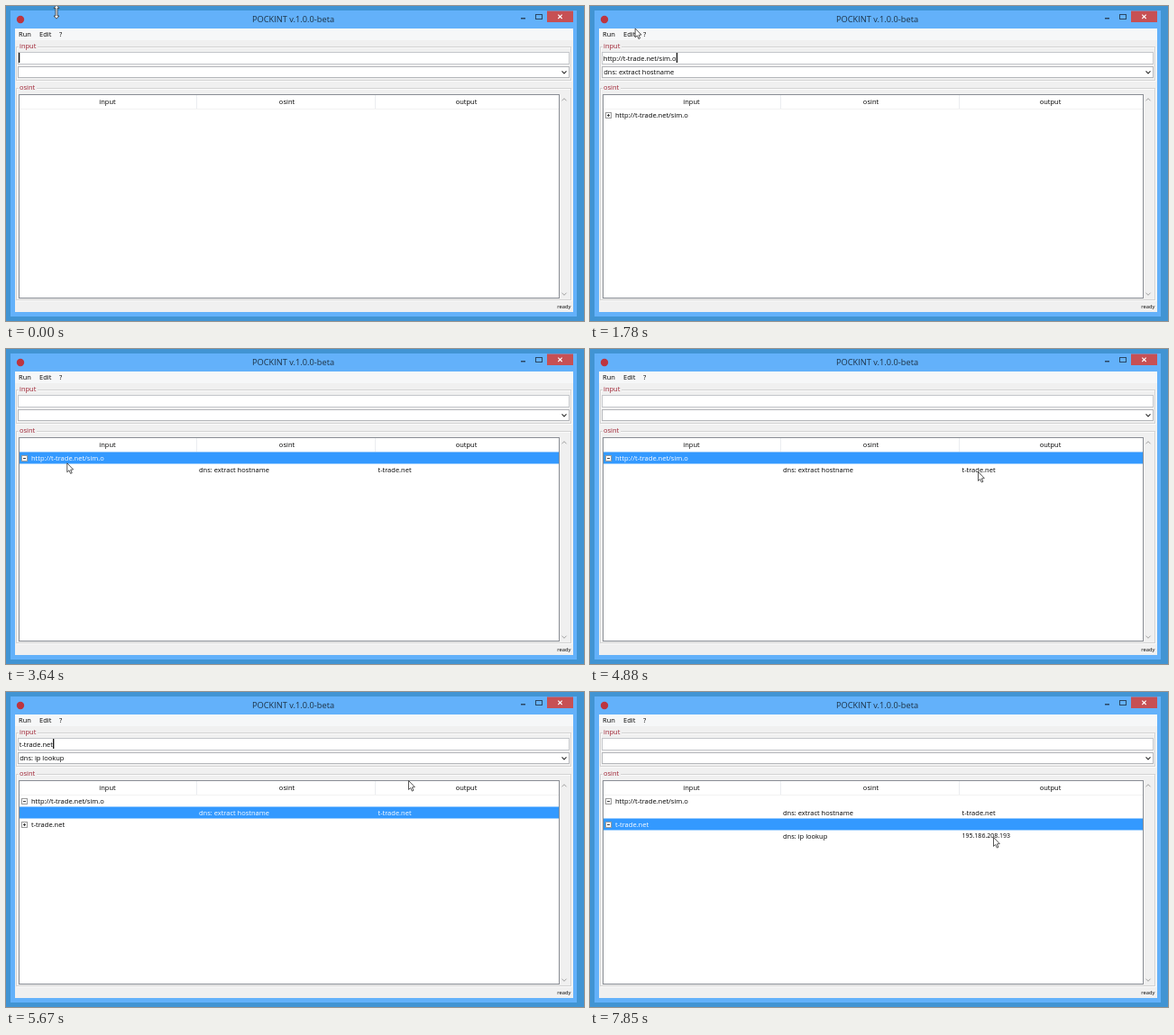
Animation, 641 px wide and 350 px high, one loop 8 s. Source, as an HTML page with a canvas:

```html
<!DOCTYPE html>
<html lang="en">
<head>
<meta charset="utf-8">
<title>POCKINT</title>
<style>
html, body { margin: 0; width: 641px; height: 350px; overflow: hidden; background: #4194d3; }
canvas { display: block; width: 641px; height: 350px; }
</style>
</head>
<body>
<canvas id="stage"></canvas>
<script>
const W = 641, H = 350, LOOP = 8000, STEP = 155;
const INK = '#000', BLUE = '#3399ff', RED = '#9e2030', GLYPH = '#2b4763';
const FONT = '"Open Sans", "Noto Sans", sans-serif';

const canvas = document.getElementById('stage');
const dpr = window.devicePixelRatio || 1;
canvas.width = W * dpr;
canvas.height = H * dpr;
const ctx = canvas.getContext('2d');
ctx.scale(dpr, dpr);

// Each query is pasted, focuses the list, is run, and is then opened in the tree
const queries = [
  { text: 'http://t-trade.net/sim.o', kind: 'url', task: 'dns: extract hostname',
    answer: 't-trade.net', size: 7.5, paste: 700, focus: 1160, run: 1640, open: 3340 },
  { text: 't-trade.net', kind: 'domain', task: 'dns: ip lookup',
    answer: '195.186.208.193', size: 7, paste: 5040, focus: 5040, run: 5670, open: 7070 }
];

const home = { x: 57, y: 1 };
const moves = [
  { from: 1480, to: 2560, x: 18, y: 125 },
  { from: 3340, to: 4730, x: 430, y: 136 },
  { from: 5160, to: 5500, x: 446, y: 98 },
  { from: 5670, to: 6600, x: 18, y: 147 },
  { from: 7070, to: 7800, x: 447, y: 161 }
];

function rect(x, y, w, h, color) {
  ctx.fillStyle = color;
  ctx.fillRect(x, y, w, h);
}

function frame(x, y, w, h, color) {
  ctx.strokeStyle = color;
  ctx.lineWidth = 1;
  ctx.strokeRect(x + 0.5, y + 0.5, w - 1, h - 1);
}

function box(x, y, w, h, border) {
  rect(x, y, w, h, '#fff');
  frame(x, y, w, h, border);
}

function line(points, color, width) {
  ctx.strokeStyle = color;
  ctx.lineWidth = width;
  ctx.beginPath();
  points.forEach(([x, y]) => ctx.lineTo(x, y));
  ctx.stroke();
}

// y is the middle of the line of text
function label(str, x, y, { size = 7.5, color = INK, align = 'left' } = {}) {
  ctx.font = `${size}px ${FONT}`;
  ctx.textAlign = align;
  ctx.fillStyle = color;
  ctx.fillText(str, x, y + size * 0.35);
}

function chevron(x, y, dir, color, width) {
  line([[x - 2.5, y - 1.3 * dir], [x, y + 1.3 * dir], [x + 2.5, y - 1.3 * dir]], color, width);
}

function group(name, y, h, gap) {
  frame(12, y + 1, 616, h, '#fafafa');
  frame(11, y, 616, h, '#d3d3d3');
  rect(14, y - 1, gap, 3, '#f0f0f0');
  label(name, 15, y - 0.2, { color: RED });
}

function drawTitleBar() {
  ctx.fillStyle = '#bd3540';
  ctx.beginPath();
  ctx.arc(16, 15, 4.2, 0, 7);
  ctx.fill();
  label('POCKINT v.1.0.0-beta', 318.5, 15.2, { size: 9.25, color: '#1d3145', align: 'center' });
  rect(571, 13, 5, 1.5, GLYPH);
  frame(587, 9, 8, 6, GLYPH);
  rect(600, 5.5, 29, 12.5, '#c75054');
  line([[612.3, 9.7], [616.7, 14]], '#fff', 1.1);
  line([[616.7, 9.7], [612.3, 14]], '#fff', 1.1);
}

function drawWindow() {
  rect(0, 0, W, H, '#4194d3');
  rect(5, 5, 628, 340, '#63b1fa');
  drawTitleBar();
  rect(10, 25, 619, 315, '#f0f0f0');
  rect(10, 25, 619, 13, '#f6f7f8');
  label('Run', 14, 31);
  label('Edit', 37, 31);
  label('?', 59, 31);

  group('input', 45, 38, 21);
  box(13, 51, 612, 14, '#c4c6ca');
  box(13, 67, 612, 13, '#b4b6ba');
  chevron(619, 73.7, 1, '#333', 1.2);

  group('osint', 91, 236, 20);
  box(14, 98, 600, 227, '#898d94');
  rect(15, 114, 598, 1, '#f2f2f2');
  ['input', 'osint', 'output'].forEach((name, i) => {
    label(name, 112.5 + 199 * i, 106.4, { align: 'center' });
    if (i) rect(13 + 198 * i, 99, 1, 15, '#ebedf0');
  });
  chevron(619, 104, -1, '#a2a2a2', 1);
  chevron(619, 320, 1, '#a2a2a2', 1);
}

function drawCaret(t, query, x) {
  const since = query && t >= query.run ? t - query.run : t + 380;
  if (since % 900 < 600) rect(x, 52, 1.3, 11, '#111');
}

function drawForm(t) {
  const query = queries.find(q => t >= q.paste && t < q.open);
  const focused = query && t >= query.focus && t < query.run;
  let end = 14;
  if (query) {
    label(query.text, 14.8, 57.9);
    end = 15 + ctx.measureText(query.text).width;
    if (focused) rect(14.5, 68, 597.5, 11, BLUE);
    if (t >= query.focus) label(query.task, 15.2, 73.6, { color: focused ? '#fff' : INK });
  }
  if (!focused && (query || t < queries[0].paste)) drawCaret(t, query, end);
  label(focused ? 'input: ' + query.kind : 'ready', 626.5, 334, { size: 5.8, align: 'right' });
}

function expander(y, open) {
  box(17, y - 3, 7, 7, '#9a9a9a');
  rect(19, y, 3, 1, '#444');
  if (!open) rect(20, y - 1, 1, 3, '#444');
}

function drawTree(t) {
  const [first, second] = queries;
  const selected = t >= second.open ? 2 : t >= second.paste ? 1 : t >= first.open ? 0 : -1;
  queries.forEach((q, i) => {
    const row = 2 * i, y = 121 + 26 * i;
    const color = n => n === selected ? '#fff' : INK;
    if (selected >> 1 === i) rect(15, 114.5 + 13 * selected, 598, 13, BLUE);
    if (t >= q.run) {
      expander(y, t >= q.open);
      label(q.text, 28, y, { color: color(row) });
    }
    if (t >= q.open) {
      label(q.task, 214, y + 13, { color: color(row + 1) });
      label(q.answer, 412.5, y + 13, { size: q.size, color: color(row + 1) });
    }
  });
}

function shape(x, y, points) {
  ctx.beginPath();
  points.forEach(([px, py]) => ctx.lineTo(x + px, y + py));
  ctx.closePath();
  ctx.fillStyle = '#fff';
  ctx.fill();
  ctx.strokeStyle = '#3a3a3a';
  ctx.lineWidth = 0.85;
  ctx.stroke();
}

function pointerAt(t) {
  let { x, y } = home;
  for (const m of moves) {
    const k = Math.min(1, Math.max(0, (t - m.from) / (m.to - m.from)));
    const ease = k * k * (3 - 2 * k);
    x += (m.x - x) * ease;
    y += (m.y - y) * ease;
  }
  return [x, y];
}

function drawPointer(t) {
  if (t < 220) {
    const half = [[0, 7.5], [3, 4.3], [1, 4.3], [1, -4.3], [3, -4.3], [0, -7.5]];
    const mirrored = half.slice(1, 5).reverse().map(([x, y]) => [-x, y]);
    shape(56, 6.7, [...half, ...mirrored]);
    return;
  }
  const [x, y] = pointerAt(1160 + STEP * Math.floor((t - 1160) / STEP));
  shape(x + 0.5, y + 0.5, [[0, 0], [0, 10], [2.2, 8], [3.8, 11.6], [5.4, 10.9], [3.9, 7.4], [6.8, 7.1]]);
}

const start = performance.now();
function draw() {
  const t = (performance.now() - start) % LOOP;
  drawWindow();
  drawForm(t);
  drawTree(t);
  drawPointer(t);
  requestAnimationFrame(draw);
}
draw();
</script>
</body>
</html>
```
